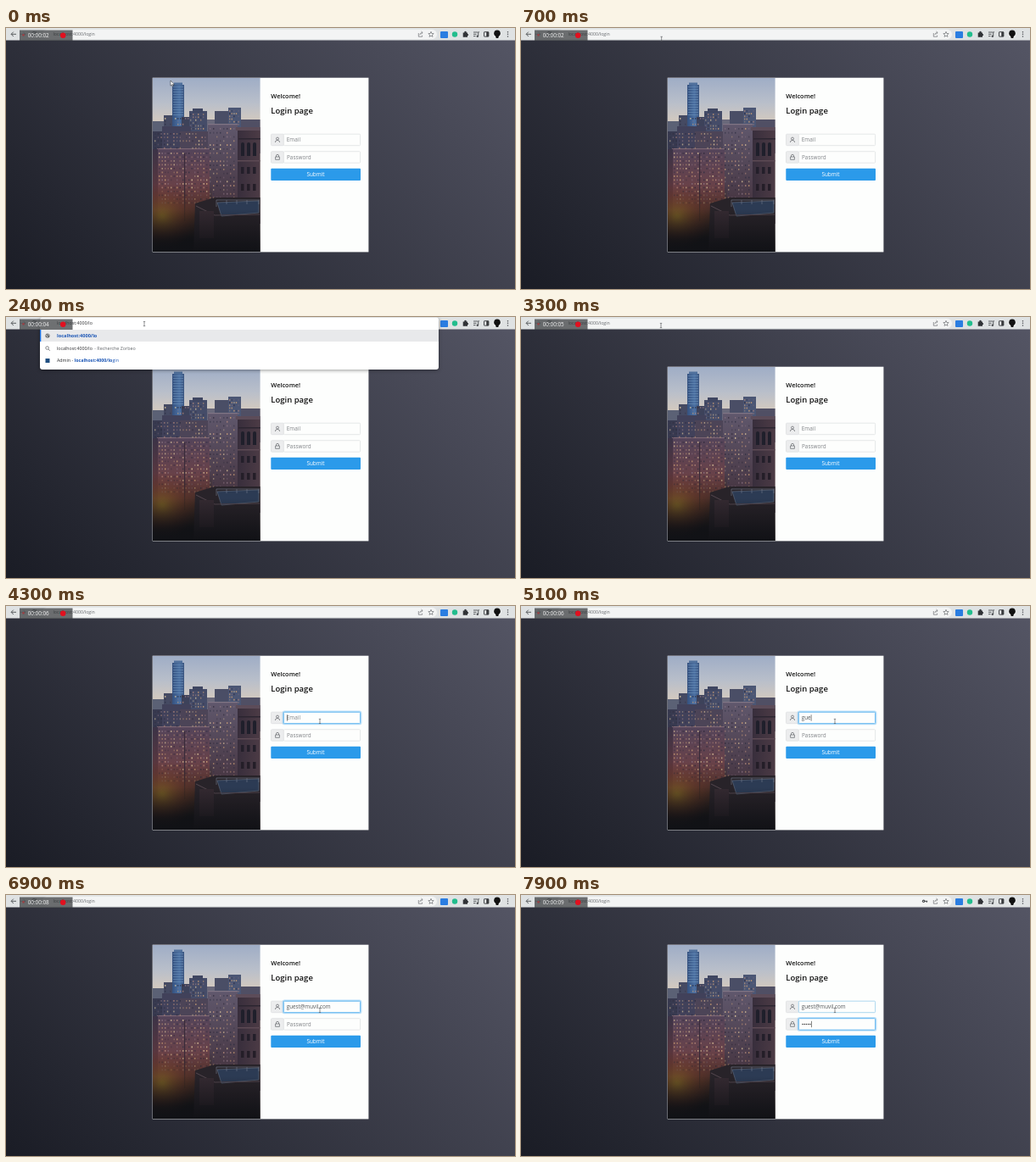
Animation of 600 by 308 pixels, one loop 8000 ms. Source, as an HTML page with a canvas:

```html
<!DOCTYPE html>
<html lang="en">
<head>
<meta charset="utf-8">
<title>Login page</title>
<style>
html, body { margin: 0; width: 100%; height: 100%; overflow: hidden; background: #2c2d37; }
canvas { display: block; width: 600px; height: 308px; }
</style>
</head>
<body>
<canvas id="stage"></canvas>
<script>
const W = 600, H = 308, LOOP = 8000;
const SANS = '"Open Sans", "Noto Sans", sans-serif';
const URL_BASE = 'localhost:4000/';
const EMAIL = 'guest@muvil.com';
const dpr = window.devicePixelRatio || 1;
const stage = document.getElementById('stage');

function prepare(canvas) {
  canvas.width = W * dpr;
  canvas.height = H * dpr;
  const c = canvas.getContext('2d');
  c.scale(dpr, dpr);
  return c;
}
const screen = prepare(stage);
let ctx = screen;

function rect(x, y, w, h, fill) {
  ctx.fillStyle = fill;
  ctx.fillRect(x, y, w, h);
}
function round(x, y, w, h, r, fill, stroke, width = 1) {
  ctx.beginPath();
  ctx.roundRect(x, y, w, h, r);
  if (fill) { ctx.fillStyle = fill; ctx.fill(); }
  if (stroke) { ctx.strokeStyle = stroke; ctx.lineWidth = width; ctx.stroke(); }
}
function oval(x, y, rx, ry, fill) {
  ctx.beginPath();
  ctx.ellipse(x, y, rx, ry, 0, 0, Math.PI * 2);
  ctx.fillStyle = fill;
  ctx.fill();
}
const disc = (x, y, r, fill) => oval(x, y, r, r, fill);
function path(d, stroke, width = 0.8, fill) {
  const p = new Path2D(d);
  if (fill) { ctx.fillStyle = fill; ctx.fill(p); }
  if (stroke) { ctx.strokeStyle = stroke; ctx.lineWidth = width; ctx.stroke(p); }
}
function at(x, y, draw) {
  ctx.save();
  ctx.translate(x, y);
  draw();
  ctx.restore();
}
// Draws text and returns the x where it ends.
function text(s, x, y, size, color, weight = 400) {
  ctx.font = `${weight} ${size}px ${SANS}`;
  ctx.fillStyle = color;
  ctx.fillText(s, x, y);
  return x + ctx.measureText(s).width;
}
function linear(x0, y0, x1, y1, ...stops) {
  const g = ctx.createLinearGradient(x0, y0, x1, y1);
  stops.forEach(([p, c]) => g.addColorStop(p, c));
  return g;
}
const down = (y0, y1, a, b) => linear(0, y0, 0, y1, [0, a], [1, b]);
function random(seed) {
  return () => (seed = (seed * 16807) % 2147483647) / 2147483647;
}
const clamp = v => Math.max(0, Math.min(1, v));
const ease = v => { v = clamp(v); return v * v * (3 - 2 * v); };
const typed = (t, start, step, max) =>
  Math.max(0, Math.min(max, Math.floor((t - start) / step)));

// Small lit and dark windows scattered over a facade.
function windows(rnd, x, y, w, h, dx, dy, share) {
  const tones = ['#d9a878', '#c09080', '#efd6a4', '#2c2d40', '#30293a', '#8c7482'];
  for (let r = y; r < y + h; r += dy) {
    for (let c = x; c < x + w; c += dx) {
      if (rnd() > share) continue;
      ctx.globalAlpha = 0.3 + rnd() * 0.5;
      rect(c, r, 1.4, 1.8, tones[Math.floor(rnd() * tones.length)]);
    }
  }
  ctx.globalAlpha = 1;
}

function drawCity() {
  const rnd = random(4127);
  ctx.save();
  ctx.beginPath();
  ctx.rect(173, 59, 126.6, 205);
  ctx.clip();
  rect(173, 59, 127, 205, linear(0, 59, 0, 118, [0, '#9fadc6'], [0.5, '#b9bfca'], [1, '#dccdbb']));

  // skyline
  rect(173, 110, 14, 40, '#5b6175');
  rect(186, 103, 11, 40, '#454a62');
  rect(196, 67, 14, 70, linear(196, 0, 210, 0, [0, '#35517f'], [0.6, '#4c71a3'], [1, '#3c5680']));
  rect(198, 64.5, 10, 3, '#50709c');
  for (let y = 69; y < 104; y += 3) rect(197, y, 12, 0.6, '#6c8fb8');
  rect(207, 105, 10, 30, '#3d425a');
  rect(216, 98, 21, 40, '#454c68');
  rect(220, 95, 12, 5, '#3f4661');
  rect(237, 108, 10, 30, '#69687a');
  rect(246, 98, 16, 40, '#4a4e66');
  rect(262, 94, 15, 40, '#4b5674');
  rect(277, 108, 23, 40, '#504f64');
  windows(rnd, 187, 106, 28, 16, 3, 3.4, 0.6);
  windows(rnd, 217, 101, 18, 18, 3, 3.4, 0.6);
  windows(rnd, 263, 97, 12, 18, 2.6, 3.2, 0.7);

  // brick blocks
  rect(173, 122, 30, 142, '#383a50');
  rect(184, 116, 34, 148, '#41415a');
  rect(205, 122, 36, 142, '#4c4457');
  rect(238, 113, 35, 151, down(113, 220, '#60586d', '#43313c'));
  rect(238, 113, 35, 1.2, '#807585');
  rect(178, 143, 62, 121, down(143, 210, '#54445a', '#74403f'));
  rect(178, 142, 62, 1.2, '#7c6672');
  rect(210, 148, 1.2, 80, '#382b39');
  rect(173, 143, 6, 121, down(143, 210, '#3b3347', '#69383a'));
  windows(rnd, 175, 124, 62, 17, 3.7, 4.2, 0.7);
  windows(rnd, 180, 147, 59, 60, 3.5, 4.5, 0.85);
  windows(rnd, 240, 118, 31, 84, 4, 4.8, 0.75);

  // street glow below the blocks
  rect(173, 185, 70, 79, linear(0, 185, 0, 250, [0, 'rgba(45,32,30,0)'], [0.55, 'rgba(48,36,26,.75)'], [1, '#17171a']));
  const glow = ctx.createRadialGradient(184, 222, 2, 184, 222, 40);
  glow.addColorStop(0, 'rgba(150,122,36,0.5)');
  glow.addColorStop(0.6, 'rgba(140,72,40,0.2)');
  glow.addColorStop(1, 'rgba(120,50,40,0)');
  rect(173, 180, 66, 84, glow);

  // near tower and terrace
  rect(273, 121, 27, 110, linear(273, 0, 300, 0, [0, '#382e3c'], [1, '#4c3b45']));
  rect(271, 117, 29, 4, '#5c4c59');
  rect(274, 130, 26, 1.5, '#2b2530');
  for (let x = 277; x < 298; x += 7) {
    round(x, 135, 4, 16, [2, 2, 0, 0], '#1f1f2b');
    rect(x, 164, 3.5, 8, '#231f2a');
    rect(x, 184, 3.5, 8, '#241e28');
  }
  rect(273, 156, 27, 1.5, '#5d4a54');
  path('M223 207L246 200L300 200V264H221Z', null, 0, '#282329');
  path('M249 206L298 204V218L254 222Z', '#59667a', 0.7, '#2c3b54');
  path('M248 203H299M248 203V211M260 203V208M272 203V208M284 203V208M298 203V208', '#727a8c', 0.6);
  path('M224 210L246 221L300 220', '#54474f', 1);
  rect(228, 216, 17, 32, '#342a31');
  rect(173, 214, 127, 50, linear(0, 214, 0, 264, [0, 'rgba(14,15,19,0)'], [0.6, 'rgba(14,15,19,.55)'], [1, '#111216']));
  ctx.restore();
}

function drawPage() {
  rect(0, 0, W, H, linear(76, 385, 524, -62, [0, '#1a1c25'], [1, '#545564']));
  rect(172.7, 58.7, 254.7, 205.7, '#fdfefd');
  drawCity();
  text('Welcome!', 312.3, 82.7, 7.4, '#111', 600);
  text('Login page', 312.3, 101, 9.5, '#111', 600);
  round(312.3, 165.7, 105.7, 14.3, 1, '#2b9aea');
  ctx.textAlign = 'center';
  text('Submit', 365, 175.3, 6.4, '#fff');
  ctx.textAlign = 'left';
}

function drawToolbar() {
  rect(0, 0, W, 14.5, '#dfe2e3');
  const ink = '#4b4e52';
  path('M12 7.3H6.2M8.8 4.6L6.1 7.3L8.8 10', ink, 0.9);
  path('M17 7.3H23M20.5 5L23 7.3L20.5 9.6', '#8b8e92');
  path('M35 5.6A2.7 2.7 0 1 0 35.2 8.5M35.3 4.2V6.2H33.2', ink);
  round(512, 4, 9, 8, 1, '#2a7de1');
  disc(529, 7.5, 3.2, '#22bd8d');
  path('M538.7 5.5H540.4A1.2 1.2 0 1 1 542.6 5.5H544V7A1.1 1.1 0 1 1 544 9.2V10.8H538.7Z', null, 0, '#303236');
  path('M551 5H556M551 7.3H554.5M551 9.6H553.5M556.7 9.8V4.8H558', ink, 0.9);
  disc(555.8, 9.8, 1.2, ink);
  round(563.5, 4.7, 5.4, 5.4, 0.4, null, '#35373a', 0.9);
  rect(566.3, 4.7, 2.6, 5.4, '#35373a');
  disc(579, 7.3, 5, '#eceeee');
  oval(579, 6.2, 3.8, 3.8, '#111');
  round(577.3, 8, 3.4, 4, 1.2, '#111');
  [4.7, 7.3, 9.9].forEach(y => disc(591.5, y, 0.75, ink));
}

function drawRecorder(t) {
  rect(16, 2.5, 62.5, 12.5, 'rgba(62,64,67,0.75)');
  const sec = Math.floor(2.35 + 0.9 * t / 1000);
  text('00:00:' + String(sec).padStart(2, '0'), 25.7, 11.1, 6.3, '#f4f4f4');
  disc(20.5, 8.3, 1.3, '#9b4145');
  disc(67.2, 8.7, 3.2, '#e2101f');
}

const magnifier = 'M1 1L2.8 2.8M1.4 -0.5A1.8 1.8 0 1 1 -2.2 -0.5A1.8 1.8 0 1 1 1.4 -0.5';

function drawGlobe(x, y) {
  disc(x, y, 2.6, '#686c70');
  at(x, y, () => path('M-2 -0.8L-0.2 0.1L-0.7 1.8M0.4 -2L1.9 -0.2', '#e8eaed', 0.7));
}

function drawSuggestions(tail) {
  const query = URL_BASE + tail, blue = '#1a55b5', gray = '#66696d';
  ctx.save();
  ctx.shadowColor = 'rgba(0,0,0,0.4)';
  ctx.shadowBlur = 4 * dpr;
  ctx.shadowOffsetY = dpr;
  round(40, 0.5, 470, 61.5, 3, '#fff');
  ctx.restore();
  text(query, 60, 9.3, 5.25, '#2b2c2f');
  rect(40, 15, 470, 14, '#e8e9eb');
  rect(40, 15, 1.3, 14, '#1a73e8');
  drawGlobe(49, 22);
  text(query, 60, 23.8, 5.6, blue, 700);
  at(49, 37, () => path(magnifier, gray));
  let x = text(query, 60, 38.9, 5.25, '#2b2c2f');
  text(' - Recherche Zorbeo', x + 1, 38.9, 5.35, gray);
  round(46.5, 49, 5, 5, 0, '#204e80');
  x = text('Admin - ', 60, 53.2, 5.3, '#2b2c2f');
  x = text(query, x, 53.2, 5.3, blue, 700);
  text('login'.slice(tail.length), x, 53.2, 5.3, blue);
}

function drawAddress(t) {
  const focused = t >= 900 && t < 2900;
  const tail = 'login'.slice(0, 5 - (t < 2900 ? typed(t, 1850, 150, 5) : 0));
  if (focused && tail.length < 5) {
    drawSuggestions(tail);
    if (t % 1060 < 180) {
      ctx.font = `400 5.25px ${SANS}`;
      rect(60.3 + ctx.measureText(URL_BASE + tail).width, 4, 0.6, 7, '#222');
    }
    return;
  }
  round(42.5, 1.7, 465.5, 11.6, 5.8, focused ? '#fff' : '#f3f4f4', focused && '#3b83d8', 1.3);
  if (focused && t < 1250) rect(55, 3.7, 50.2, 7.6, '#b5d4fb');
  let x = text('localhost', 55.5, 9.3, 5.25, '#2b2c2f');
  x = text(':4000/login', x, 9.3, 5.25, focused ? '#2b2c2f' : '#65686c');
  if (focused && t >= 1250 && (t - 1250) % 1060 < 530) rect(x + 0.3, 4, 0.6, 7, '#222');
  const ink = '#6a6d71';
  path('M486.3 6V10.2H490.6V8.7M487.8 8.2Q488 5.6 490.8 5.5M489.5 4L491.2 5.5L489.5 7', ink, 0.7);
  path('M501 4.3L501.9 6.5L504.2 6.6L502.4 8.1L503 10.4L501 9.1L499 10.4L499.6 8.1L497.8 6.6L500.1 6.5Z', ink, 0.7);
  if (t >= 7290) {
    disc(474.6, 7.3, 1.7, '#44474a');
    disc(474.5, 7.3, 0.6, '#f3f4f5');
    path('M476 7.3H479.2M478.2 7.3V8.8', '#44474a', 1.1);
  }
}

function drawField(y, focus, hover) {
  round(312.5, y + 0.5, 15, 13.5, 1, '#ecedee', '#dcdee0', 0.7);
  if (focus) round(327, y + 0.2, 91, 14, 1.5, null, 'rgba(70,170,240,0.35)', 2.8);
  round(327.3, y + 0.5, 90.3, 13.5, 1, '#fdfefd',
    focus ? '#62b6ef' : hover ? '#8cc6ea' : '#dcdee0', focus ? 1 : 0.7);
}

function drawForm(t, mouse) {
  const inEmail = t >= 4100 && t < 6950, inPass = t >= 6950;
  const chars = typed(t, 4600, 140, EMAIL.length);
  const dots = typed(t, 7150, 140, 5);
  const over = y => mouse.x > 327 && mouse.x < 418 && mouse.y > y && mouse.y < y + 14.5;
  const hint = '#808387';
  drawField(124.7, inEmail, over(124.7));
  drawField(145.2, inPass, over(145.2));
  at(320, 132, () => path('M1.5 -1.4A1.5 1.5 0 1 1 -1.5 -1.4A1.5 1.5 0 1 1 1.5 -1.4M-2.7 3Q-2.4 0.4 0 0.4Q2.4 0.4 2.7 3', '#606367', 0.7));
  at(320, 152.3, () => path('M-2.4 -0.3H2.4V3H-2.4ZM-1.5 -0.3V-1.5A1.5 1.5 0 0 1 1.5 -1.5V-0.3', '#606367', 0.7));

  let x = 330.8;
  if (chars) x = text(EMAIL.slice(0, chars), x, 134.3, 6.25, '#55585c');
  else text('Email', x, 134.3, 6.4, hint);
  const typing = t >= 4600 && t < 6800;
  if (inEmail && (typing || (t - 4100) % 1060 < 530)) rect(x + 0.2, 128.3, 0.6, 7.4, '#333');

  x = 331;
  if (dots) {
    for (let i = 0; i < dots; i++) disc(x + 1 + i * 2.2, 152.4, 0.75, '#333');
    x += dots * 2.2;
  } else {
    text('Password', x, 154.7, 6.4, hint);
  }
  if (inPass && (dots || (t - 6950) % 1060 < 530)) rect(x + 0.2, 148.8, 0.6, 7.4, '#333');
}

const STOPS = [[0, 194, 65], [250, 194, 65], [800, 163, 8], [2900, 163, 8],
  [3150, 165, 10], [3400, 165, 10], [4050, 370, 136], [LOOP, 370, 136]];

function mouseAt(t) {
  const i = Math.max(1, STOPS.findIndex(s => s[0] > t));
  const [t0, x0, y0] = STOPS[i - 1], [t1, x1, y1] = STOPS[i];
  const k = ease((t - t0) / (t1 - t0));
  return { x: x0 + (x1 - x0) * k, y: y0 + (y1 - y0) * k };
}

function drawMouse({ x, y }) {
  const inBar = y < 14, inField = x > 327 && x < 418 && y > 125 && y < 160;
  at(x, y, () => {
    if (inBar || inField) path('M-1.2 -2.6H1.2M0 -2.6V2.6M-1.2 2.6H1.2', '#4a4c50', 0.6);
    else path('M0 -3V3.2L1.4 1.9L2.4 4L3.3 3.6L2.3 1.6H4.3Z', '#222', 0.5, '#fff');
  });
}

const backdrop = document.createElement('canvas');
ctx = prepare(backdrop);
drawPage();
drawToolbar();
ctx = screen;

function frame(now) {
  const t = now % LOOP;
  const mouse = mouseAt(t);
  ctx.drawImage(backdrop, 0, 0, W, H);
  drawForm(t, mouse);
  drawAddress(t);
  drawRecorder(t);
  drawMouse(mouse);
}

const start = performance.now();
function tick() {
  frame(performance.now() - start);
  requestAnimationFrame(tick);
}
tick();
</script>
</body>
</html>
```
